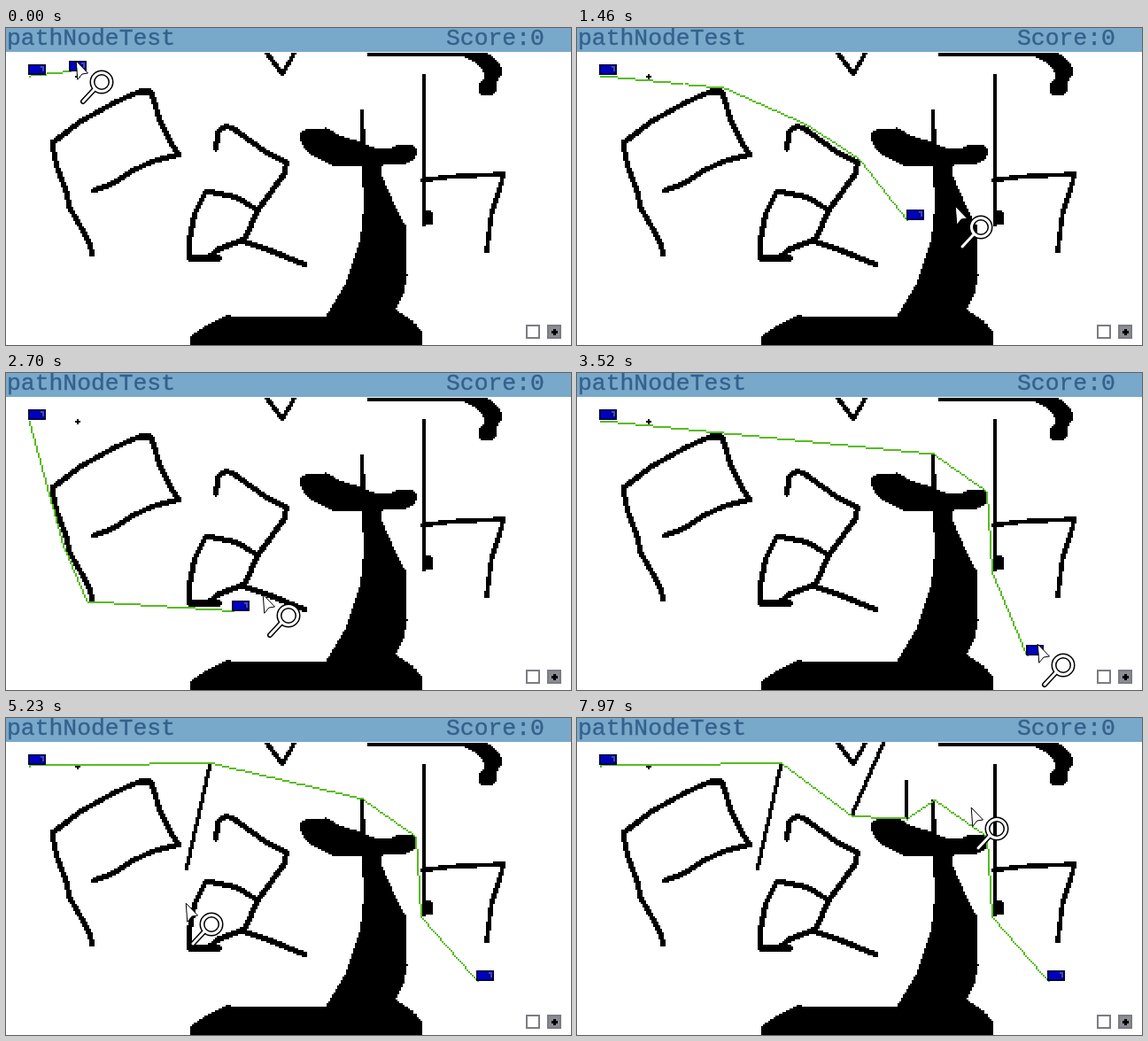
An HTML page with a canvas that plays this animation: 638 px wide and 358 px high, repeating every 7990 ms.

```html
<!DOCTYPE html>
<html lang="en">
<head>
<meta charset="utf-8">
<title>pathNodeTest</title>
<style>
  html, body { margin: 0; width: 100%; height: 100%; overflow: hidden; background: #fff; }
  canvas { position: absolute; left: 0; top: 0; }
  header { position: absolute; left: 0; top: 0; width: 638px; height: 27px; background: #78a8ca;
    color: #35618c; font: 26.4px/27px "Liberation Mono", monospace; -webkit-text-stroke: .4px; }
  header span { position: absolute; top: -1px; white-space: pre; }
</style>
</head>
<body>
<header><span style="left:1px">pathNodeTest</span><span style="left:497px">Score:0</span></header>
<canvas id="stage" width="638" height="358"></canvas>
<script>
const LOOP = 7990, LAG = 60;
const ctx = document.getElementById('stage').getContext('2d');
ctx.imageSmoothingEnabled = false;

// Hand-drawn strokes: line width, then x y pairs
const strokes = [
  '6 97 255 95 245 84 224 72 203 68 185 57 155 52 130 85 105 125 83 150 72 164 72 174 105 185 128 195 143 170 149 145 160 120 176 98 184',
  '6 237 136 240 116 248 111 256 113 275 127 295 141 317 152 314 165 285 205 268 241 300 252 337 267',
  '6 283 205 260 191 226 184 213 210 208 235 206 260 242 260',
  '6 230 258 240 250 268 239',
  '5 472 54 472 222',
  '5 470 172 500 168 562 165 558 180 548 210 543 252',
  '5 293 26 312 52 327 26',
  '5 402 94 403 140'
].map(s => {
  const [width, ...n] = s.split(' ').map(Number);
  return { width, pts: pairs(n) };
});
const body = 'M331 122Q335 113 345 114L362 113 376 121 395 127 420 137 436 135Q452 127 463 135V145' +
  'Q458 154 442 154L425 155 424 166 440 202 452 225 453 280 449 300 440 318 458 330 470 342 471 358' +
  'H209V347L228 335 247 325 361 326 384 288 400 240 404 200 402 156H370L350 146Q334 138 331 122Z';
const hook = 'M408 25H530L545 29Q562 40 560 52L555 60Q556 77 544 77Q532 77 533 66Q536 59 541 57' +
  'L538 47 530 39 515 31H408Z';

// Strokes added with the cursor; "solid" is when the path starts to avoid them
const added = [
  { start: 4400, end: 4730, solid: 5040, from: [230, 54], to: [204, 170] },
  { start: 5800, end: 5950, solid: 6090, from: [346, 28], to: [311, 107] },
  { start: 7000, end: 7200, solid: 7350, from: [371, 72], to: [372, 111] }
];
const nodes = pairs([166,68, 48,133, 65,195, 92,258, 199,146, 96,187, 258,109, 318,148, 234,139,
  203,264, 340,269, 404,92, 463,134, 469,225, 479,226, 472,50, 566,162, 543,256, 231,51, 203,174,
  311,111, 372,114]);
const spine = pairs([345,128, 375,140, 402,140, 452,140, 425,155, 430,260, 400,335, 215,345]);
const fixedWalls = [...strokes.map(s => s.pts), spine].flatMap(segments);

// Cursor track: time, x, y
const track = `0 79 37,200 79 37,260 80 38,460 80 38,700 170 80,950 215 215,1100 280 240,1250 292 170,
1400 383 205,1460 426 201,1700 590 308,1900 500 312,2060 390 300,2250 300 310,2450 90 280,2640 267 257,
2700 290 250,2870 370 290,3150 480 200,3300 555 250,3460 519 307,3520 520 306,3680 543 285,3950 543 285,
4400 230 54,4730 204 170,5040 204 170,5230 203 209,5330 190 221,5800 346 30,5850 338 46,5950 311 107,
6090 311 107,6260 299 147,6440 299 147,6560 351 110,6760 351 110,7000 371 72,7200 372 111,7530 408 48,
7770 408 48,7970 445 101,7990 445 101`.split(',').map(k => k.trim().split(' ').map(Number));

function pairs(n) {
  return n.flatMap((v, i) => i % 2 ? [] : [[v, n[i + 1]]]);
}
function segments(pts) {
  return pts.slice(1).map((p, i) => [pts[i], p]);
}
function mix(a, b, k) {
  return a.map((v, i) => v + (b[i] - v) * k);
}
function cursorAt(t) {
  const i = Math.max(1, track.findIndex(k => k[0] >= t));
  const [a, b] = [track[i - 1], track[i]];
  return mix(a.slice(1), b.slice(1), (t - a[0]) / (b[0] - a[0]));
}

const side = (a, b, c) => (b[0] - a[0]) * (c[1] - a[1]) - (b[1] - a[1]) * (c[0] - a[0]);
const crosses = (a, b, c, d) => side(a, b, c) * side(a, b, d) < 0 && side(c, d, a) * side(c, d, b) < 0;

// Shortest route through mutually visible nodes (Dijkstra)
function route(from, to, walls) {
  const open = [from, to, ...nodes].map(p => ({ p, cost: Infinity }));
  const goal = open[1];
  open[0].cost = 0;
  while (open.length) {
    open.sort((a, b) => a.cost - b.cost);
    const cur = open.shift();
    if (cur === goal || cur.cost === Infinity) break;
    for (const next of open) {
      const cost = cur.cost + Math.hypot(next.p[0] - cur.p[0], next.p[1] - cur.p[1]);
      if (cost < next.cost && !walls.some(w => crosses(cur.p, next.p, ...w)))
        Object.assign(next, { cost, prev: cur });
    }
  }
  const path = [];
  for (let n = goal; n; n = n.prev) path.unshift(n.p);
  return path;
}

// Blocky line on a 2 px grid
function pixelLine(a, b, size, color) {
  const steps = Math.max(1, Math.ceil(Math.max(Math.abs(b[0] - a[0]), Math.abs(b[1] - a[1])) / 2));
  ctx.fillStyle = color;
  for (let i = 0; i <= steps; i++) {
    const [x, y] = mix(a, b, i / steps).map(v => Math.round((v - size / 2) / 2) * 2);
    ctx.fillRect(x, y, size, size);
  }
}
function rect(color, ...box) {
  ctx.fillStyle = color;
  ctx.fillRect(...box);
}

function makeArt() {
  const art = document.createElement('canvas');
  art.width = 319;
  art.height = 179;
  const g = art.getContext('2d');
  g.scale(.5, .5);
  g.lineCap = g.lineJoin = 'round';
  for (const s of strokes) {
    g.lineWidth = s.width;
    g.beginPath();
    s.pts.forEach(p => g.lineTo(...p));
    g.stroke();
  }
  g.fill(new Path2D(body));
  g.fill(new Path2D(hook));
  g.fillRect(470, 207, 11, 15);
  g.fillRect(79, 53, 4, 4);
  g.clearRect(0, 0, 638, 27);
  const img = g.getImageData(0, 0, 319, 179);
  for (let i = 3; i < img.data.length; i += 4) img.data[i] = img.data[i] > 120 ? 255 : 0;
  g.putImageData(img, 0, 0);
  return art;
}

function drawAgent(x, y) {
  x = Math.round(x);
  y = Math.round(y);
  rect('#000048', x, y, 20, 12);
  rect('#0000c4', x + 2, y + 2, 12, 8);
  rect('#3848d8', x + 14, y + 2, 4, 2);
  rect('#3848d8', x + 16, y + 4, 2, 4);
  rect('#0000c4', x + 14, y + 8, 4, 2);
}

const arrow = new Path2D('M.5 .5L13.5 14 7 15 2 21Z');
const ring = new Path2D('M39.5 24A10.5 10.5 0 1 1 18.5 24A10.5 10.5 0 1 1 39.5 24Z');
const handle = new Path2D('M21 32L8 46');
function drawCursor(x, y) {
  ctx.save();
  ctx.translate(Math.round(x), Math.round(y));
  ctx.lineCap = 'round';
  ctx.lineWidth = 1;
  ctx.fillStyle = '#fff';
  ctx.strokeStyle = '#000';
  ctx.fill(arrow);
  ctx.stroke(arrow);
  for (const [color, width] of [['#000', 6], ['#fff', 3]]) {
    ctx.strokeStyle = color;
    ctx.lineWidth = width;
    ctx.stroke(handle);
    ctx.stroke(ring);
  }
  ctx.restore();
}

function drawButtons() {
  rect('#7c7c84', 587, 335, 16, 16);
  rect('#fff', 589, 337, 12, 12);
  rect('#7c7c84', 611, 335, 16, 16);
  rect('#8c8c94', 613, 337, 12, 12);
  rect('#000', 618, 340, 3, 7);
  rect('#000', 616, 342, 7, 3);
}

const art = makeArt();
function draw(t) {
  ctx.clearRect(0, 0, 638, 358);
  ctx.drawImage(art, 0, 0, 638, 358);
  for (const s of added)
    if (t >= s.start)
      pixelLine(s.from, mix(s.from, s.to, Math.min(1, (t - s.start) / (s.end - s.start))), 4, '#000');
  ctx.clearRect(0, 0, 638, 27);

  const drag = cursorAt(Math.min(t - LAG, 3700));
  const agent = t < 460 + LAG ? [71, 37] : [drag[0] - 12, drag[1]];
  const walls = [...fixedWalls, ...added.filter(s => t >= s.solid).map(s => [s.from, s.to])];
  const path = route([26, 54], [agent[0] + 1, agent[1] + 12], walls);
  for (const [a, b] of segments(path)) pixelLine(a, b, 2, '#58bc20');

  drawAgent(25, 41);
  drawAgent(...agent);
  drawButtons();
  drawCursor(...cursorAt(t));
}

function tick(now) {
  draw(now % LOOP);
  requestAnimationFrame(tick);
}
draw(0);
requestAnimationFrame(tick);
</script>
</body>
</html>
```
